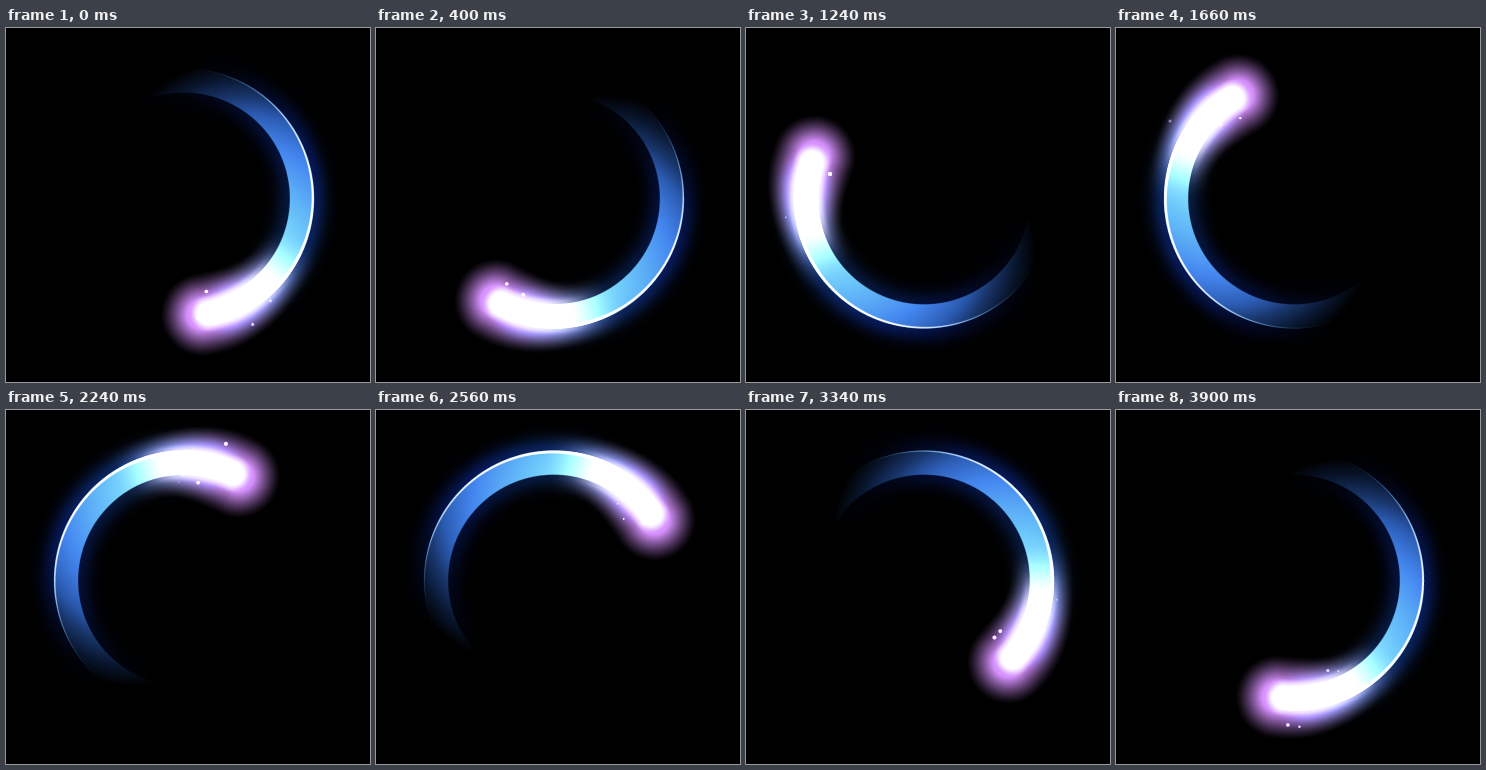
Recreate the animation shown at these times as an HTML page with a canvas. Size 364 by 354 pixels, loop 3920 ms.

```html
<!DOCTYPE html>
<html lang="en">
<head>
<meta charset="utf-8">
<title>Comet ring</title>
<style>
  html, body { margin: 0; width: 100%; height: 100%; overflow: hidden; background: #000; }
  canvas { display: block; }
</style>
</head>
<body>
<canvas id="stage" width="364" height="354"></canvas>
<script>
const LOOP = 3920, STEP = 20;
const CX = 178, CY = 170.5;
const INNER = 105.8, OUTER = 130, MID = 117.5;
const START = 78, SPEED = 0.0967; // degrees, degrees per ms
const HALF = 170, SCALE = 2;
const RAD = Math.PI / 180;

const ctx = document.getElementById('stage').getContext('2d');
const clamp = v => Math.min(1, Math.max(0, v));
const smooth = (a, b, v) => { const k = clamp((v - a) / (b - a)); return k * k * (3 - 2 * k); };
const bell = v => Math.exp(-v * v);

// Trail colour by degrees behind the head
const TRAIL = [
  [0, 190, 250, 255], [45, 150, 240, 255], [70, 105, 195, 250], [105, 68, 135, 240],
  [130, 44, 92, 180], [148, 24, 52, 104], [168, 9, 22, 46], [190, 0, 0, 0]
];

function trailColor(a) {
  if (a >= 190) return [0, 0, 0];
  const i = Math.max(1, TRAIL.findIndex(s => s[0] > a));
  const p = TRAIL[i - 1], q = TRAIL[i];
  const k = clamp((a - p[0]) / (q[0] - p[0]));
  return [1, 2, 3].map(c => p[c] + (q[c] - p[c]) * k);
}

// Distance to the arc that starts at angle `from` and runs backwards
function arcDistance(r, a, from) {
  if (a >= from) return Math.abs(r - MID);
  const d = (a - from) * RAD;
  return Math.sqrt(r * r + MID * MID - 2 * r * MID * Math.cos(d));
}

function shade(r, a) {
  const across = clamp((r - INNER) / (OUTER - INNER));
  const base = trailColor(a * 190 / (190 - 25 * across));
  const front = smooth(-3, 12, a);
  const band = clamp(r - INNER + 0.5) * clamp(OUTER - r + 0.5) * front;
  const off = r > OUTER ? (r - OUTER) / 13 : (INNER - r) / 13;
  const haze = off > 0 ? (r > OUTER ? 0.36 : 0.24) * bell(off) * front * (1 - band) : 0;

  // Bright rim, tapering and turning blue towards the tail
  const width = 4.2 * clamp(1 - a / 175);
  const rim = clamp(OUTER - r + 0.5) * clamp(r - OUTER + width + 0.5)
    * front * (1 - smooth(110, 168, a));
  const blue = smooth(85, 150, a);
  const rimTint = [255 - 150 * blue, 255 - 75 * blue, 255];

  const body = smooth(0, 45, a);
  const reach = 42 - 10 * body;
  const glowDist = arcDistance(r, a, -3);
  const glow = Math.pow(clamp((reach - glowDist) / (reach - 15)), 1.25) * (1 - smooth(10, 60, a));
  const tint = [215, 145 + 50 * body, 255];
  const core = (1 - smooth(10, 20, arcDistance(r, a, 0))) * (1 - smooth(18, 48, a));

  return base.map((v, i) => {
    let c = v * band + [0.25, 0.5, 1][i] * v * haze;
    c += (rimTint[i] - c) * rim;
    c += tint[i] * glow;
    return c + (255 - Math.min(255, c)) * core;
  });
}

// The comet is painted once, head pointing along +x, then rotated
function paintComet() {
  const size = HALF * 2 * SCALE;
  const sprite = document.createElement('canvas');
  sprite.width = sprite.height = size;
  const g = sprite.getContext('2d');
  const img = g.createImageData(size, size);
  for (let y = 0, p = 0; y < size; y++) {
    for (let x = 0; x < size; x++, p += 4) {
      const dx = (x + 0.5) / SCALE - HALF, dy = (y + 0.5) / SCALE - HALF;
      const r = Math.hypot(dx, dy);
      img.data[p + 3] = 255;
      if (r < 65 || r > 168) continue;
      let a = -Math.atan2(dy, dx) / RAD;
      if (a < -60) a += 360;
      const c = shade(r, a);
      for (let i = 0; i < 3; i++) img.data[p + i] = c[i];
    }
  }
  g.putImageData(img, 0, 0);
  return sprite;
}

function random(seed) {
  const v = Math.sin(seed * 127.1 + 11.7) * 43758.5453;
  return v - Math.floor(v);
}

const headAngle = t => START + t * SPEED;

const GAP = 85, LIFE = 420;
function drawSparks(t) {
  ctx.save();
  ctx.globalCompositeOperation = 'lighter';
  ctx.fillStyle = '#f0c4ff';
  for (let k = Math.ceil((t - LIFE) / GAP); k * GAP <= t; k++) {
    const [a, b, c, d, e] = [1, 2, 3, 4, 5].map(n => random(k * 7 + n));
    const age = (t - k * GAP) / LIFE;
    const angle = (headAngle(k * GAP) + 8 * a) * RAD;
    const radius = MID + (b - 0.5) * 56;
    const x = CX + radius * Math.cos(angle) + (c - 0.5) * 14 * age;
    const y = CY + radius * Math.sin(angle) + (d - 0.5) * 14 * age;
    ctx.globalAlpha = 0.85 * (1 - age * age);
    ctx.beginPath();
    ctx.arc(x, y, (0.9 + 1.4 * e) * (1 - 0.4 * age), 0, 7);
    ctx.fill();
  }
  ctx.restore();
}

const comet = paintComet();
const begin = performance.now();

function frame() {
  const t = Math.floor((performance.now() - begin) % LOOP / STEP) * STEP;
  ctx.fillStyle = '#000';
  ctx.fillRect(0, 0, 364, 354);
  ctx.save();
  ctx.translate(CX, CY);
  ctx.rotate(headAngle(t) * RAD);
  ctx.drawImage(comet, -HALF, -HALF, HALF * 2, HALF * 2);
  ctx.restore();
  drawSparks(t);
  requestAnimationFrame(frame);
}
frame();
</script>
</body>
</html>
```
